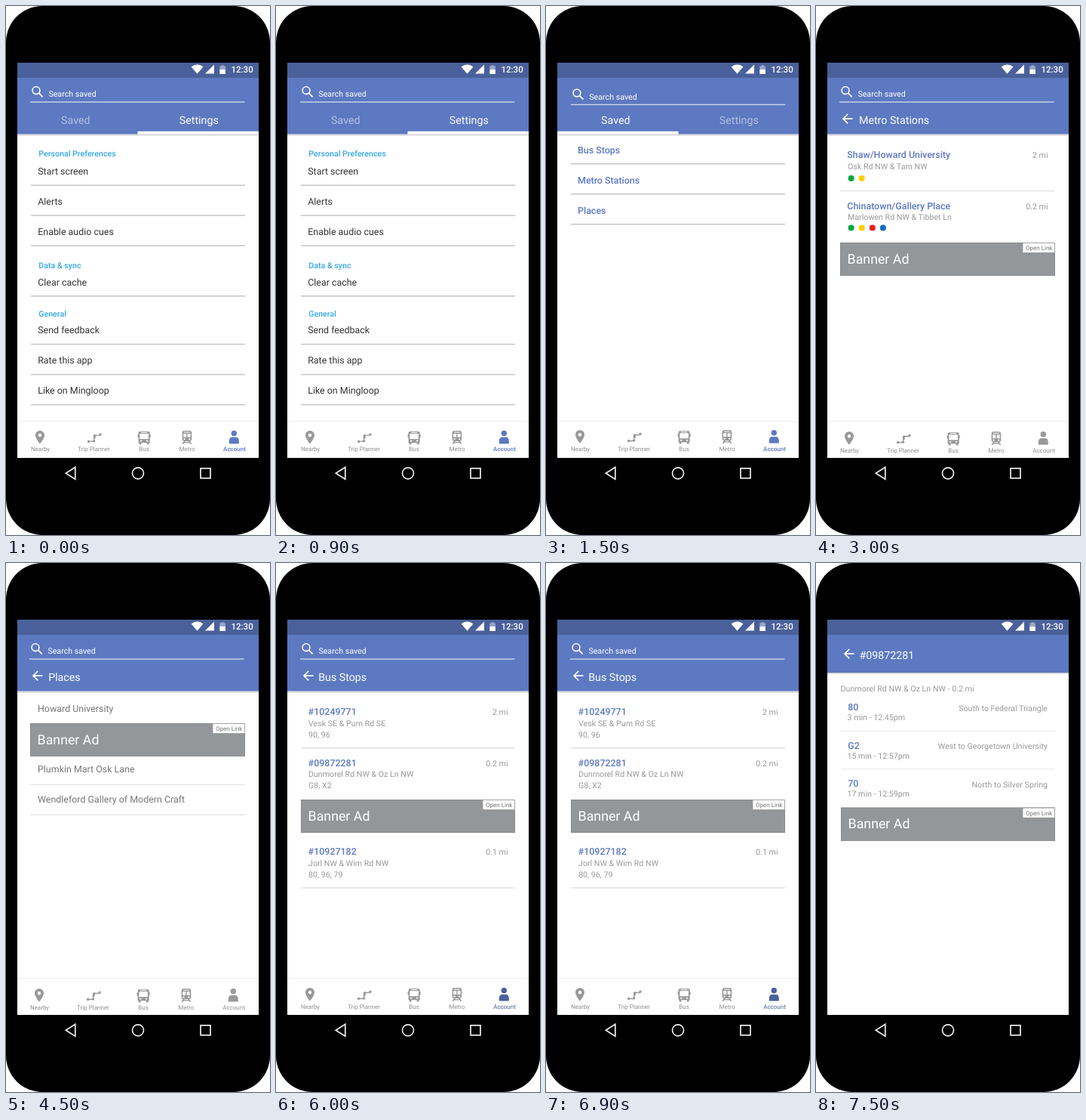
Write an HTML page that moves like this. It is 350x700 px and loops after 8 s.

```html
<!DOCTYPE html>
<html lang="en">
<head>
<meta charset="utf-8">
<title>Transit app screens</title>
<style>
  html, body { margin: 0; width: 100%; height: 100%; overflow: hidden; background: #fff; }
  svg { display: block; width: 350px; height: 700px; }
  text { font-family: Roboto, sans-serif; text-rendering: geometricPrecision; white-space: pre; }
</style>
</head>
<body>
<svg id="stage" viewBox="0 0 350 700" xmlns="http://www.w3.org/2000/svg"></svg>
<script>
const BLUE = '#5c79c1', DARK_BLUE = '#4a609a', SKY = '#37a8e6', GREY = '#999', MID = '#777', INK = '#333';
const SIZE = { tiny: 8, small: 10.67, body: 12.44, title: 14.22, banner: 17.78 };
const LOOP = 8000, HOLD = 1500;

const rect = (x, y, w, h, fill, extra = '') =>
  `<rect x="${x}" y="${y}" width="${w}" height="${h}" fill="${fill}" ${extra}/>`;
const dot = (x, y, r, fill) => `<circle cx="${x}" cy="${y}" r="${r}" fill="${fill}"/>`;
const path = (d, stroke, width = 1.6, fill = 'none') =>
  `<path d="${d}" fill="${fill}" stroke="${stroke}" stroke-width="${width}"/>`;
const shape = (d, fill) => `<path d="${d}" fill="${fill}" fill-rule="evenodd"/>`;
const at = (x, y, content) => `<g transform="translate(${x} ${y})">${content}</g>`;
const escapeText = s => s.replace(/&/g, '&amp;');

function text(s, x, y, size, fill, { weight = 400, anchor = 'start' } = {}) {
  return `<text x="${x}" y="${y}" font-size="${SIZE[size] || size}" fill="${fill}" ` +
    `font-weight="${weight}" text-anchor="${anchor}">${escapeText(s)}</text>`;
}
const bold = (s, x, y, size, fill) => text(s, x, y, size, fill, { weight: 500 });
const right = (s, y, x = 307.5) => text(s, x, y, 'small', GREY, { anchor: 'end' });
const rule = (y, color = '#c9c9c9', h = 1.6, x = 33) => rect(x, y - h / 2, 317 - x, h, color);

function phone() {
  return rect(0, 0, 350, 700, '#000', 'rx="48"') + rect(15, 75, 320, 523, '#fff') +
    path('M91.8 610.2V626.3L79.3 618.2Z', '#eee', 1.7) +
    '<circle cx="175" cy="618.3" r="7.5" fill="none" stroke="#eee" stroke-width="1.7"/>' +
    rect(258, 611.8, 13, 13, 'none', 'stroke="#eee" stroke-width="1.7"');
}

function statusBar() {
  return rect(15, 75, 320, 20, DARK_BLUE) +
    shape('M245.6 80.4Q253.5 74.6 261.4 80.4L253.5 89.8Z', '#fff') +
    shape('M276 77.5V89.5H264Z', '#fff') +
    shape('M283.3 79.4H285.5V78.2H288.7V79.4H290.9V84H283.3Z', '#9aa7c8') +
    rect(283.3, 84, 7.6, 6, '#fff') +
    bold('12:30', 298.4, 87.7, 11.56, '#fff');
}

const header = bottom => rect(15, 95, 320, bottom - 95, BLUE) +
  rect(15, bottom, 320, 1.2, '#b9bcc6') + rect(15, bottom + 1.2, 320, 1.2, '#ececee');

function search(dx, dy) {
  return at(dx, dy, '<circle cx="40" cy="111.7" r="4.9" fill="none" stroke="#fff" stroke-width="1.6"/>' +
    path('M43.5 115.2L48.6 120.3', '#fff', 1.9) +
    text('Search saved', 56.4, 120.4, 'small', '#fff') +
    rect(32, 126.4, 284.5, 1.4, '#ccd5ec'));
}

function tabs(active) {
  const label = (s, x, i) => text(s, x, 155.8, 'title', i === active ? '#fff' : '#b3c0e1', { anchor: 'middle' });
  return label('Saved', 92.3, 0) + label('Settings', 255.8, 1) +
    rect(active ? 174.5 : 15, 165.8, 160.5, 4, '#fff') +
    rect(active ? 174.5 : 15, 169.8, 160.5, 1.2, '#ddd3d7');
}

const backTitle = (s, arrowX, x, arrowY, y) =>
  path(`M${arrowX + 13.5} ${arrowY}H${arrowX + 1}m6.2 -6.2l-6.2 6.2l6.2 6.2`, '#fff', 1.7) +
  text(s, x, y, 'title', '#fff');

const navIcons = {
  Nearby: [45.5, c => shape('M45 562C41.6 562 39 564.6 39 568C39 572.3 45 579.4 45 579.4S51 572.3 51 568C51 564.6 48.4 562 45 562ZM45 565.8a2.2 2.2 0 1 1 0 4.4a2.2 2.2 0 1 1 0 -4.4Z', c)],
  'Trip Planner': [116.5, c => path('M109.6 576.2H116.6V567.8L118 572.5V568.2H125', c, 1.3) +
    [[109.6, 576.2], [116.6, 575.6], [117.6, 568.6], [125, 567]].map(([x, y]) => dot(x, y, 1.7, c)).join('')],
  Bus: [183, c => shape('M177.3 563H189Q190.7 563 190.7 565V578H189.6V580.2H186.8V578H179.5V580.2H176.7V578H175.6V565Q175.6 563 177.3 563ZM177.4 566V573H188.9V566ZM179 564V564.9H187.3V564ZM178 574.6V576.2H180.4V574.6ZM185.9 574.6V576.2H188.3V574.6Z', c) +
    rect(174.6, 567, 1.5, 4, c) + rect(190.2, 567, 1.5, 4, c)],
  Metro: [240, c => shape('M236 562H243.8Q246.2 562 246.2 564.4V573.4Q246.2 575.4 244 575.6L246.4 579.4H244.4L243.6 578.2H236.2L235.4 579.4H233.4L235.8 575.6Q233.6 575.4 233.6 573.4V564.4Q233.6 562 236 562ZM235.2 566V570.6H239.2V566ZM240.6 566V570.6H244.6V566ZM236 563.5V564.5H243.8V563.5ZM235.6 572.3V574.1H237.6V572.3ZM242.2 572.3V574.1H244.2V572.3ZM237.4 576V576.9H242.4V576Z', c)],
  Account: [303, c => dot(302.3, 565.4, 3.7, c) + shape('M295.8 579.2V576Q295.8 570.6 300 570.6H304.6Q308.8 570.6 308.8 576V579.2Z', c)]
};

function nav(dx, dy, activeColor, labelDy = 0, weight = 400) {
  const items = Object.entries(navIcons).map(([name, [x, icon]]) => {
    const color = name === 'Account' && activeColor || '#999';
    const active = color !== '#999';
    return icon(color) + text(name, x, 589.4 + labelDy, 'tiny', active ? color : '#8e8e8e',
      { anchor: 'middle', weight: active ? weight : 400 });
  });
  return rect(15, 549, 320, 1.2, '#efefef') + at(dx, dy, items.join(''));
}

function banner(x, y) {
  return rect(x, y, 317 - x, 44, '#939799') +
    rect(x + .4, y + .4, 316.2 - x, 43.2, 'none', 'stroke="#85898b" stroke-width=".8"') +
    rect(274, y + .5, 42.5, 13, '#fff', 'stroke="#9a9a9a" stroke-width=".8"') +
    text('Open Link', 278, y + 9.9, 'tiny', MID) +
    text('Banner Ad', x + 9.6, y + 27.6, 'banner', '#fff');
}

function settings() {
  const sections = [
    ['Personal Preferences', 199.2, [['Start screen', 223], ['Alerts', 263], ['Enable audio cues', 303]]],
    ['Data & sync', 346.6, [['Clear cache', 369.6]]],
    ['General', 410.6, [['Send feedback', 433.4], ['Rate this app', 473.4], ['Like on Mingloop', 513.4]]]
  ];
  return header(169.6) + search(0, 0) + tabs(1) +
    sections.map(([title, y, rows]) => bold(title, 43.2, y, 'small', SKY) +
      rows.map(([s, rowY]) => text(s, 42.2, rowY, 'body', INK) + rule(rowY + 14.2)).join('')).join('') +
    nav(0, 0, BLUE, 0, 500);
}

function saved() {
  return header(169.6) + search(.9, 3.4) + tabs(0) +
    ['Bus Stops', 'Metro Stations', 'Places'].map((s, i) =>
      bold(s, 42, 194.8 + 40 * i, 'body', BLUE) + rule(208.8 + 40 * i)).join('') +
    nav(0, -.7, BLUE, 0, 500);
}

const detailHeader = (title, dx, x) => header(169.6) + search(dx, 0) + backTitle(title, 36 + dx, x, 149.2, 155.8);

function stations() {
  const lines = ['#00a742', '#fdd000', '#ec1c24', '#0f6bbf'];
  const rows = [
    ['Shaw/Howard University', 'Osk Rd NW & Tarn NW', '2 mi', 201.4, 228, 2],
    ['Chinatown/Gallery Place', 'Marlowen Rd NW & Tibbet Ln', '0.2 mi', 269, 293.5, 4]
  ];
  return detailHeader('Metro Stations', -1, 57) + rows.map(([name, place, far, y, dotY, count]) =>
      bold(name, 41.3, y, 'body', BLUE) + text(place, 42, y + 14.4, 'small', GREY) + right(far, y) +
      lines.slice(0, count).map((c, i) => dot(46.6 + 14.1 * i, dotY, 4, c)).join('')).join('') +
    rule(244.7, '#e4e4e4', 1.3, 32) + banner(32, 313) + nav(-1, 1.3);
}

function places() {
  const rows = [['Howard University', 197], ['Plumkin Mart Osk Lane', 277.2], ['Wendleford Gallery of Modern Craft', 317.2]];
  return detailHeader('Places', -1, 56.2) + rows.map(([s, y]) => text(s, 42, y, 'body', MID)).join('') +
    banner(32, 212) + rule(293.2, '#e0e0e0', 1.2, 32) + rule(333.2, '#e0e0e0', 1.2, 32) + nav(-1, 1.3);
}

function stops() {
  const rows = [
    ['#10249771', 'Vesk SE & Pum Rd SE', '90, 96', '2 mi', 201.4],
    ['#09872281', 'Dunmorel Rd NW & Oz Ln NW', 'G8, X2', '0.2 mi', 269],
    ['#10927182', 'Jorl NW & Wim Rd NW', '80, 96, 79', '0.1 mi', 386.3]
  ];
  return detailHeader('Bus Stops', 0, 56.2) + rows.map(([id, place, routes, far, y]) =>
      bold(id, 42.6, y, 'body', BLUE) + text(place, 43, y + 14.2, 'small', GREY) +
      text(routes, 43, y + 29.2, 'small', GREY) + right(far, y)).join('') +
    rule(244.7, '#e6e6e6', 1.8) + rule(429.8, '#e6e6e6', 1.8) + banner(33, 313) + nav(0, .3, DARK_BLUE);
}

function arrivals() {
  const rows = [
    ['80', '3 min - 12:45pm', 'South to Federal Triangle'],
    ['G2', '15 min - 12:57pm', 'West to Georgetown University'],
    ['70', '17 min - 12:59pm', 'North to Silver Spring']
  ];
  return header(145) + backTitle('#09872281', 37, 57.6, 120.2, 127) +
    text('Dunmorel Rd NW & Oz Ln NW - 0.2 mi', 32.6, 169.8, 'small', GREY) +
    rows.map(([route, due, towards], i) => {
      const y = 195 + 50.6 * i;
      return bold(route, 42.3, y, 'body', BLUE) + text(due, 41.5, y + 13.2, 'small', GREY) + right(towards, y + .6, 307);
    }).join('') +
    rule(222.2, '#ececec', 1.2) + rule(272.8, '#ececec', 1.2) + banner(33, 323.6);
}

const screens = [settings, saved, stations, places, stops, arrivals];
const stage = document.getElementById('stage');
stage.innerHTML = phone() + statusBar() +
  screens.map(draw => `<g class="screen" visibility="hidden">${draw()}</g>`).join('');
const layers = stage.querySelectorAll('.screen');

const start = performance.now();
function show(now) {
  const current = Math.floor((Math.max(0, now - start) % LOOP) / HOLD);
  layers.forEach((layer, i) => layer.setAttribute('visibility', i === current ? 'visible' : 'hidden'));
  requestAnimationFrame(show);
}
show(start);
</script>
</body>
</html>
```
